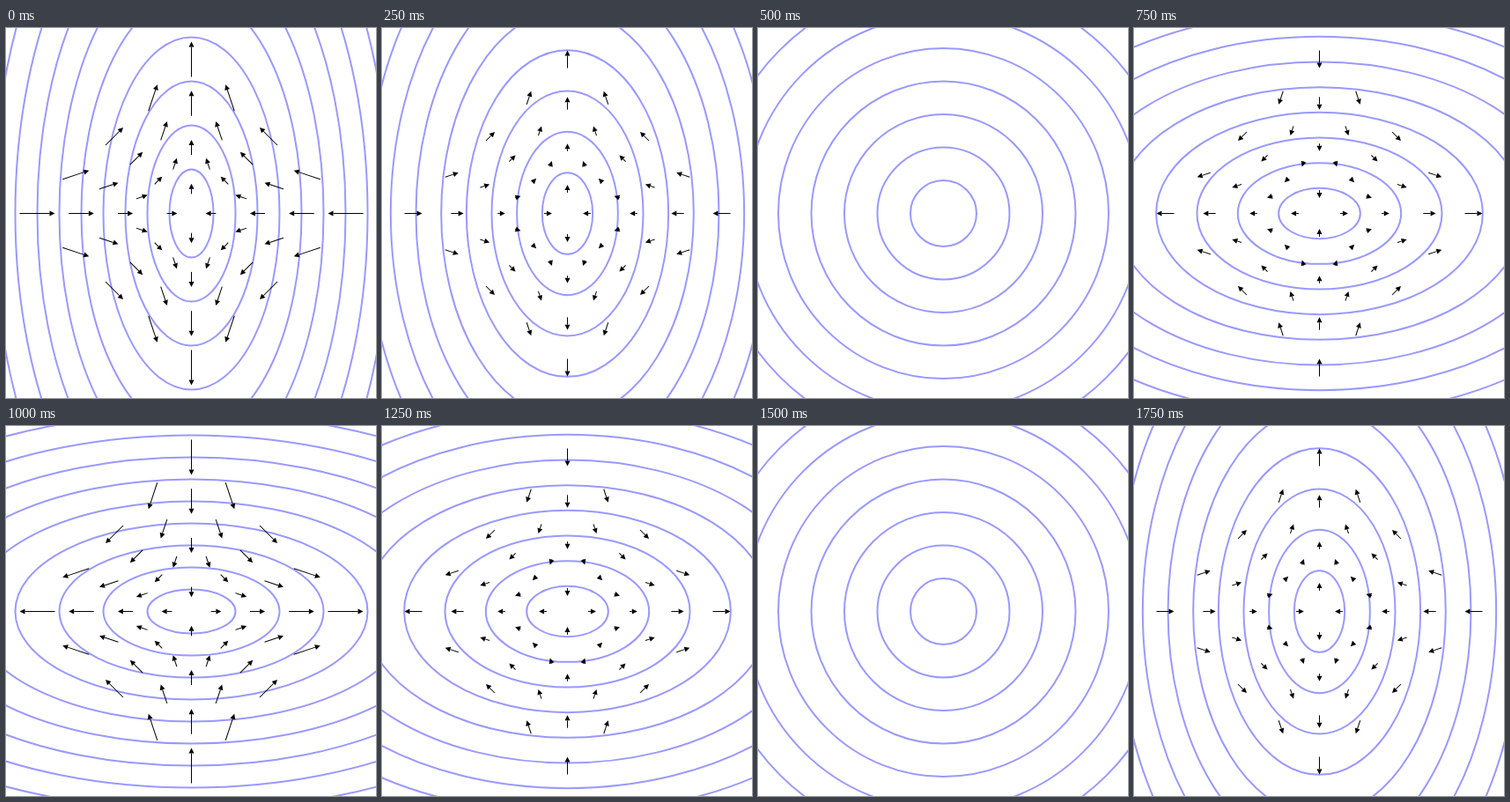
Recreate the animation shown at these times as an HTML page with a canvas. Size 420 by 420 pixels, loop 2 s.

```html
<!DOCTYPE html>
<html lang="en">
<head>
<meta charset="utf-8">
<title>Oscillating ellipses</title>
<style>
  html, body { margin: 0; width: 100%; height: 100%; overflow: hidden; background: #fff; }
  canvas { display: block; }
</style>
</head>
<body>
<canvas id="stage" width="420" height="420"></canvas>
<script>
const ctx = document.getElementById('stage').getContext('2d');
const CENTER = 210.5, STEP_MS = 250, STEPS = 8, HEAD = 6;

// Arrow anchors lie on nested diamonds |x| + |y| = r.
const anchors = [];
for (const r of [25, 75, 125, 175]) {
  const sides = r === 25 ? 1 : 4;
  for (let i = 0; i < sides; i++) {
    let x = r * (1 - i / sides), y = r * i / sides;
    for (let quarter = 0; quarter < 4; quarter++) {
      anchors.push([x, y]);
      [x, y] = [-y, x];
    }
  }
}

function drawArrow(x, y, dx, dy) {
  const length = Math.hypot(dx, dy);
  if (length < 0.01) return;
  // Very short shafts carry their head beyond the end.
  const base = length < HEAD ? length / 2 : length / 2 - HEAD;
  ctx.save();
  ctx.translate(x, y);
  ctx.rotate(Math.atan2(dy, dx));
  ctx.beginPath();
  ctx.moveTo(-length / 2, 0);
  ctx.lineTo(base, 0);
  ctx.stroke();
  ctx.beginPath();
  ctx.moveTo(base + HEAD, 0);
  ctx.lineTo(base, -3);
  ctx.lineTo(base, 3);
  ctx.fill();
  ctx.restore();
}

function draw(step) {
  const wave = Math.cos(step * 2 * Math.PI / STEPS);
  const rx = 37.5 - 12.5 * wave, ry = 37.5 + 12.5 * wave;
  const pull = 40 / 175 * wave * Math.abs(wave);

  ctx.setTransform(1, 0, 0, 1, 0, 0);
  ctx.fillStyle = '#fff';
  ctx.fillRect(0, 0, 420, 420);
  ctx.translate(CENTER, CENTER);

  ctx.strokeStyle = '#9999ff';
  ctx.lineWidth = 2;
  for (let n = 1; n <= 10; n++) {
    ctx.beginPath();
    ctx.ellipse(0, 0, n * rx, n * ry, 0, 0, 2 * Math.PI);
    ctx.stroke();
  }

  ctx.strokeStyle = ctx.fillStyle = '#000';
  ctx.lineWidth = 1;
  for (const [x, y] of anchors) drawArrow(x, y, -x * pull, y * pull);
}

function tick() {
  draw(Math.floor(performance.now() / STEP_MS) % STEPS);
  requestAnimationFrame(tick);
}
tick();
</script>
</body>
</html>
```
